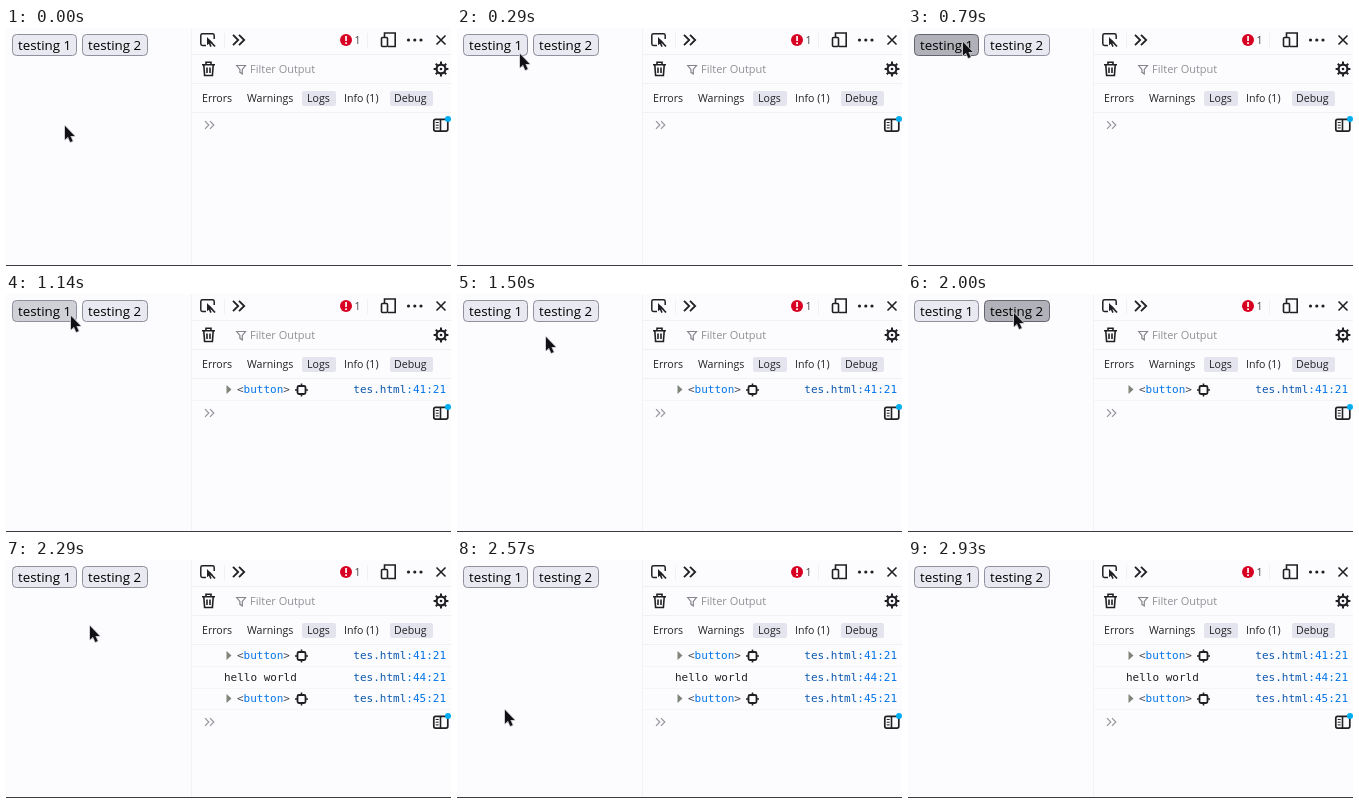
An HTML page with a canvas for the animation above (3.5 s loop, 445 px wide and 238 px high).

```html
<!DOCTYPE html>
<html lang="en">
<head>
<meta charset="utf-8">
<title>Button console demo</title>
<style>
html, body { margin: 0; width: 100%; height: 100%; overflow: hidden; background: #fcfcfe; }
canvas { display: block; width: 445px; height: 238px; }
</style>
</head>
<body>
<canvas id="stage"></canvas>
<script>
const W = 445, H = 238, LOOP = 3500, STEP = 1000 / 14;
const INK = '#202024', GREY = '#85858c', LINE = '#f1f1f5';
const SANS = '"Open Sans", "Noto Sans", sans-serif';
const MONO = '11px "DejaVu Sans Mono", monospace';

const canvas = document.getElementById('stage');
const dpr = window.devicePixelRatio || 1;
canvas.width = Math.round(W * dpr);
canvas.height = Math.round(H * dpr);
const c = canvas.getContext('2d');
c.scale(dpr, dpr);

// Pointer path: [tick, x, y]
const path = [
  [0, 59, 98], [4, 63, 26], [8, 57, 16], [11, 55, 14], [14, 55, 14],
  [21, 89, 43], [27, 106, 19], [29, 106, 19], [32, 84, 66], [36, 48, 150], [40, 24, 240]
];

function pointer(n) {
  const i = path.findIndex(p => p[0] > n);
  if (i < 0) return null;
  const [t0, x0, y0] = path[i - 1], [t1, x1, y1] = path[i];
  const k = (n - t0) / (t1 - t0);
  return { x: Math.round(x0 + (x1 - x0) * k), y: Math.round(y0 + (y1 - y0) * k) };
}

function text(s, x, y, font, color = INK) {
  c.font = font;
  c.fillStyle = color;
  c.fillText(s, x, y);
}

function box(x, y, w, h, r, fill, stroke, width = 1) {
  c.beginPath();
  c.roundRect(x, y, w, h, r);
  if (fill) { c.fillStyle = fill; c.fill(); }
  if (stroke) { c.strokeStyle = stroke; c.lineWidth = width; c.stroke(); }
}

function rect(x, y, w, h, color) {
  c.fillStyle = color;
  c.fillRect(x, y, w, h);
}

function dot(x, y, r, color) {
  c.beginPath();
  c.arc(x, y, r, 0, Math.PI * 2);
  c.fillStyle = color;
  c.fill();
}

function stroke(d, color = INK, width = 1.5) {
  c.strokeStyle = color;
  c.lineWidth = width;
  c.stroke(new Path2D(d));
}

function chevrons(x, y, size, gap, color, width) {
  for (const dx of [0, gap])
    stroke(`M${x + dx} ${y - size}l${size} ${size}l${-size} ${size}`, color, width);
}

function arrow(x, y, color, scale, outline) {
  c.save();
  c.translate(x, y);
  c.scale(scale, scale);
  const p = new Path2D('M0 0V13.5L3 10.8L5.3 16L7.6 15L5.4 10H9.6Z');
  c.lineJoin = 'round';
  if (outline) {
    c.strokeStyle = outline;
    c.lineWidth = 1.6;
    c.stroke(p);
  }
  c.fillStyle = color;
  c.fill(p);
  c.restore();
}

function button(label, x, w, at, pressed) {
  const hover = at && at.x > x && at.x < x + w && at.y > 5 && at.y < 25;
  const fill = pressed ? '#b1b1b9' : hover ? '#d0d0d7' : '#e9e9f1';
  box(x + .5, 6.5, w - 1, 21, 4, fill, pressed ? '#65656f' : '#8f8f9d');
  text(label, x + 6, 22, '500 13.33px ' + SANS, '#000');
}

function toolbar() {
  for (const y of [26, 55, 84]) rect(186, y, 259, 1, LINE);
  rect(185, 0, 1, 237, '#f3f3f6');
  rect(218, 5, 1, 15, LINE);
  rect(361, 5, 1, 15, LINE);

  // Element picker
  stroke('M200 17.5H196.5Q194.8 17.5 194.8 15.8V7.5Q194.8 5.8 196.5 5.8H206.5Q208.2 5.8 208.2 7.5V11');
  arrow(201, 9, INK, .62);
  stroke('M203 12L209 18.5', INK, 1.7);

  chevrons(227, 12, 5.2, 6, INK, 1.8);

  dot(340, 12, 6, '#d70022');
  rect(339.2, 8, 1.7, 5, '#fff');
  rect(339.2, 14.3, 1.7, 1.7, '#fff');
  text('1', 348.5, 16, '10.6px ' + SANS, '#45454b');

  // Responsive view
  stroke('M378.5 9V5H389.2V18.5H382', INK, 1.6);
  box(375.5, 9.5, 6, 9, 1, '#fcfcfe', INK, 1.6);

  for (const x of [402.5, 408.8, 415]) dot(x, 12, 1.6, INK);
  stroke('M430.5 7.5L439.5 16.5M439.5 7.5L430.5 16.5', INK, 1.6);
}

function filterRow() {
  // Trash
  stroke('M196 36.7H209M200 36V34.3H205V36M197.8 37L198.6 47.5H206.4L207.2 37M201 39.5V45M204 39.5V45', INK, 1.6);
  // Funnel
  stroke('M230.7 37.5H239.5L236.3 41.5V45.8L233.9 44.3V41.5Z', GREY, 1.2);
  text('Filter Output', 244, 45, '11px ' + SANS, '#909096');
  // Gear
  c.beginPath();
  c.arc(435, 41, 4.4, 0, Math.PI * 2);
  c.strokeStyle = INK;
  c.lineWidth = 2.2;
  c.stroke();
  for (let i = 0; i < 8; i++) {
    const a = i * Math.PI / 4, x = Math.cos(a), y = Math.sin(a);
    stroke(`M${435 + x * 4.8} ${41 + y * 4.8}L${435 + x * 7.4} ${41 + y * 7.4}`, INK, 2);
  }
  dot(435, 41, 1.3, INK);

  box(296, 63, 34, 15, 2, '#e4e4ee');
  box(384, 63, 43, 15, 2, '#e4e4ee');
  const tabs = { Errors: 196, Warnings: 241, Logs: 301, 'Info (1)': 338, Debug: 388 };
  for (const name in tabs) text(name, tabs[name], 74, '10.6px ' + SANS);
}

function logRow(i, line, plain) {
  const y = 96 + Math.round(i * 21.5), base = y + 3;
  rect(186, y + 10, 259, 1, '#f5f5f8');
  if (plain) text(plain, 218, base, MONO);
  else {
    c.fillStyle = '#80857a';
    c.fill(new Path2D(`M220.5 ${y - 5}l5 4.5l-5 4.5z`));
    text('<', 231, base, MONO, '#4a4a55');
    text('button', 237.6, base, MONO, '#0074e8');
    text('>', 277.3, base, MONO, '#4a4a55');
    box(291.5, y - 4, 8, 8, 1.5, null, INK, 1.8);
    stroke(`M295.5 ${y - 6.5}v3M295.5 ${y + 3.5}v3M289 ${y}h3M299 ${y}h3`, INK, 1.6);
  }
  text('tes.html', 347.3, base, MONO, '#0b57ae');
  text(`:${line}:21`, 400.3, base, MONO, '#0074e8');
}

function prompt(count) {
  const y = 97 + Math.round(count * 21.6);
  chevrons(199, y, 3.8, 5, '#96969c', 1.2);
  box(427.8, y - 5.7, 14, 11.8, 1.8, null, INK, 1.7);
  stroke(`M434.5 ${y - 5.5}v11.5`, INK, 1.6);
  stroke(`M429.7 ${y - 2.5}h3M429.7 ${y + .2}h3M429.7 ${y + 2.9}h3`, INK, 1);
  dot(442, y - 6, 3, '#00aef0');
}

function draw(ms) {
  const n = Math.floor(ms / STEP + .08);
  const at = pointer(n);
  const count = n >= 30 ? 3 : n >= 14 ? 1 : 0;

  rect(0, 0, W, H, '#fcfcfe');
  button('testing 1', 6, 65, at, n >= 11 && n < 14);
  button('testing 2', 76, 66, at, n >= 28 && n < 30);
  toolbar();
  filterRow();
  if (count) logRow(0, 41);
  if (count > 1) {
    logRow(1, 44, 'hello world');
    logRow(2, 45);
  }
  prompt(count);
  rect(0, 237, W, 1, '#3c3c42');
  if (at) arrow(at.x, at.y, '#101015', 1, '#c4c4ca');
}

const start = performance.now();
function tick() {
  draw((performance.now() - start) % LOOP);
  requestAnimationFrame(tick);
}
tick();
</script>
</body>
</html>
```
